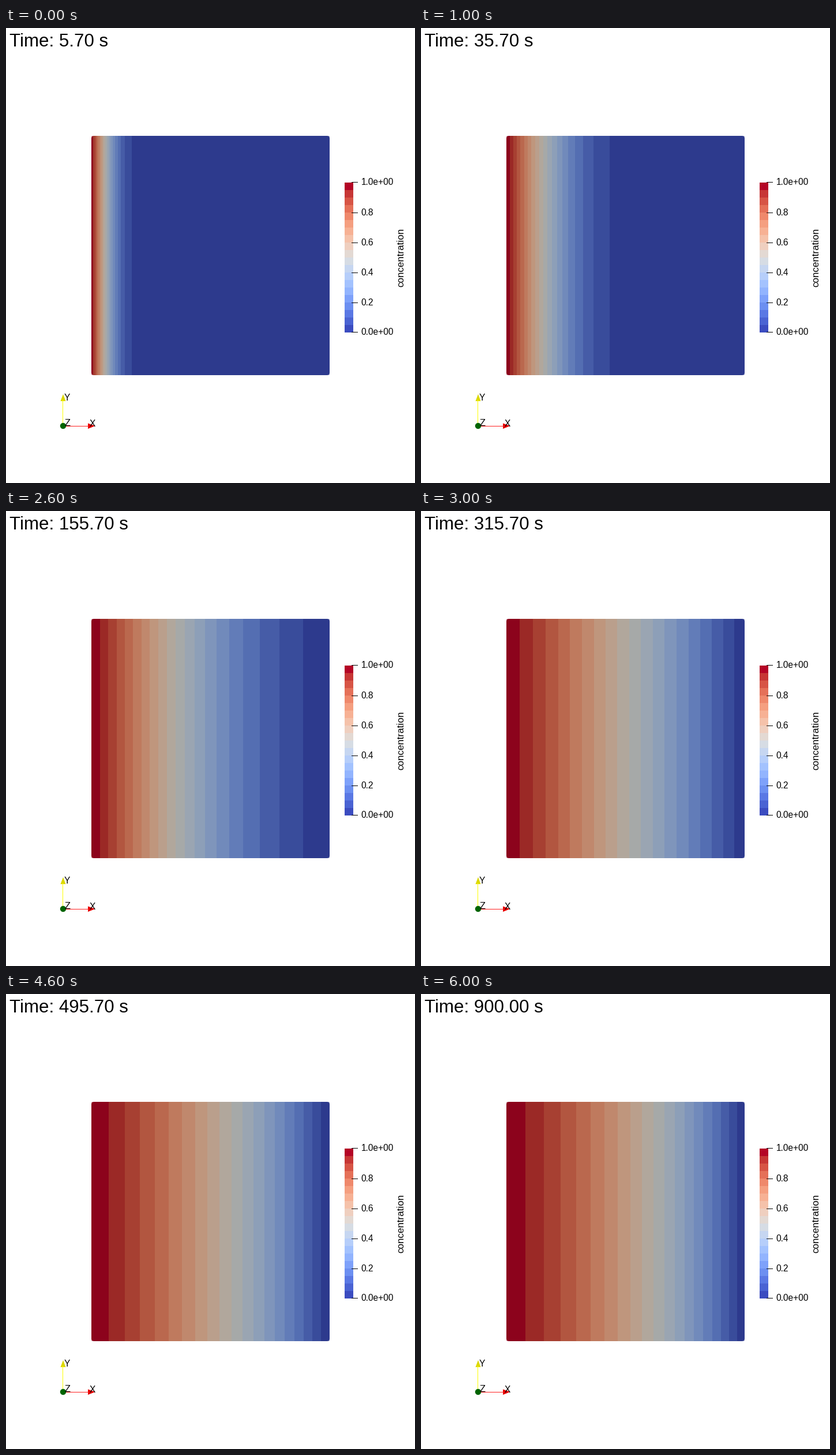
A matplotlib script for the animation above (7000 ms loop, 709 by 789 pixels).

```python
import numpy as np
import matplotlib.pyplot as plt
from matplotlib.animation import FuncAnimation
from matplotlib.patches import Circle, Polygon, Rectangle

W, H, DPI = 709, 789, 100
PT = 72 / DPI
TIMES = [5.7, 35.7, 155.7, 315.7, 495.7, 720.7, 900.0]

LEVELS = 20
LEFT, RIGHT, TOP, BOTTOM = 148, 561, 187, 602
DIFFUSIVITY = 0.00063
PECLET = 1.0
SHADE = np.array([0.78, 0.772, 0.738])   # surface lighting

palette = plt.get_cmap("coolwarm")(np.linspace(0, 1, LEVELS))[:, :3]

fig = plt.figure(figsize=(W / DPI, H / DPI), dpi=DPI, facecolor="white")
ax = fig.add_axes([0, 0, 1, 1])


def label(x, y, text, size, **kw):
    return ax.text(x, y, text, fontsize=size * PT, family="Liberation Sans",
                   color="black", ha="left", va="baseline",
                   rotation_mode="anchor", **kw)


def line(x0, y0, x1, y1, color):
    ax.plot([x0, x1], [y0, y1], color=color, lw=PT,
            solid_capstyle="butt", snap=False)


def concentration(u, t):
    """Advection-diffusion between c(0) = 1 and c(1) = 0, empty at t = 0."""
    a = PECLET / 2
    n = np.arange(1, 60)[:, None] * np.pi
    rate = n**2 + a**2
    decay = 2 * n / rate * np.sin(n * u) * np.exp(-DIFFUSIVITY * rate * t)
    steady = np.sinh(a * (1 - u)) / np.sinh(a)
    return np.exp(a * u) * (steady - decay.sum(axis=0))


def bands(t):
    x = np.arange(LEFT, RIGHT) + 0.5
    c = concentration((x - 147.6) / (RIGHT - 147.6), t)
    index = np.clip((c * LEVELS).astype(int), 0, LEVELS - 1)
    return (palette * SHADE)[index][None]


def draw_legend():
    x, top, cell = 587, 268, 13
    for i, color in enumerate(palette):
        y = top + cell * (LEVELS - 1 - i)
        ax.add_patch(Rectangle((x, y), 15, cell, fc=color, lw=0,
                               antialiased=False))
    names = ["1.0e+00", "0.8", "0.6", "0.4", "0.2", "0.0e+00"]
    for i, name in enumerate(names):
        # The two range labels sit a pixel higher than the inner ones.
        y = top + 52 * i + (0.5 if len(name) == 3 else -0.5)
        line(599, y, 610, y, "black")
        label(615.5, y + 4, name, 15.5)
    label(689, 448.5, "concentration", 17, rotation=90)


def draw_triad():
    line(98.5, 690, 98.5, 645, "#ffff00")
    line(99, 690.5, 144, 690.5, "#ff2020")
    ax.add_patch(Polygon([(99, 635), (94.5, 647), (103.5, 647)],
                         fc="#dcd800", lw=0))
    ax.add_patch(Polygon([(154.5, 690), (142, 685.5), (142, 695)],
                         fc="#e80000", lw=0))
    ax.add_patch(Circle((99, 690), 5.2, fc="#006400", lw=0, zorder=3))
    label(100.7, 646, "Y", 15.5, zorder=4)
    label(101, 690, "Z", 16.5, zorder=4)
    label(145, 691, "X", 15.5, zorder=4)


def block_outline():
    """Rectangle with very slightly bevelled corners."""
    corner = [(0, 4), (0.7, 0.7), (4, 0)]
    top = [(LEFT + x, TOP + y) for x, y in corner]
    top += [(RIGHT - x, TOP + y) for x, y in reversed(corner)]
    bottom = [(x, TOP + BOTTOM - y) for x, y in reversed(top)]
    return Polygon(top + bottom, fc="none", ec="none")


outline = block_outline()
field = ax.imshow(bands(TIMES[0]), extent=(LEFT, RIGHT, BOTTOM, TOP),
                  aspect="auto", interpolation="nearest")
ax.add_patch(outline)
field.set_clip_path(outline)
draw_legend()
draw_triad()
clock = label(6.5, 32, "", 31.3)

ax.set_xlim(0, W)
ax.set_ylim(H, 0)
ax.axis("off")


def update(i):
    field.set_data(bands(TIMES[i]))
    clock.set_text(f"Time: {TIMES[i]:.2f} s")
    return field, clock


anim = FuncAnimation(fig, update, frames=len(TIMES), interval=1000,
                     repeat=True, repeat_delay=0)
plt.show()
```
